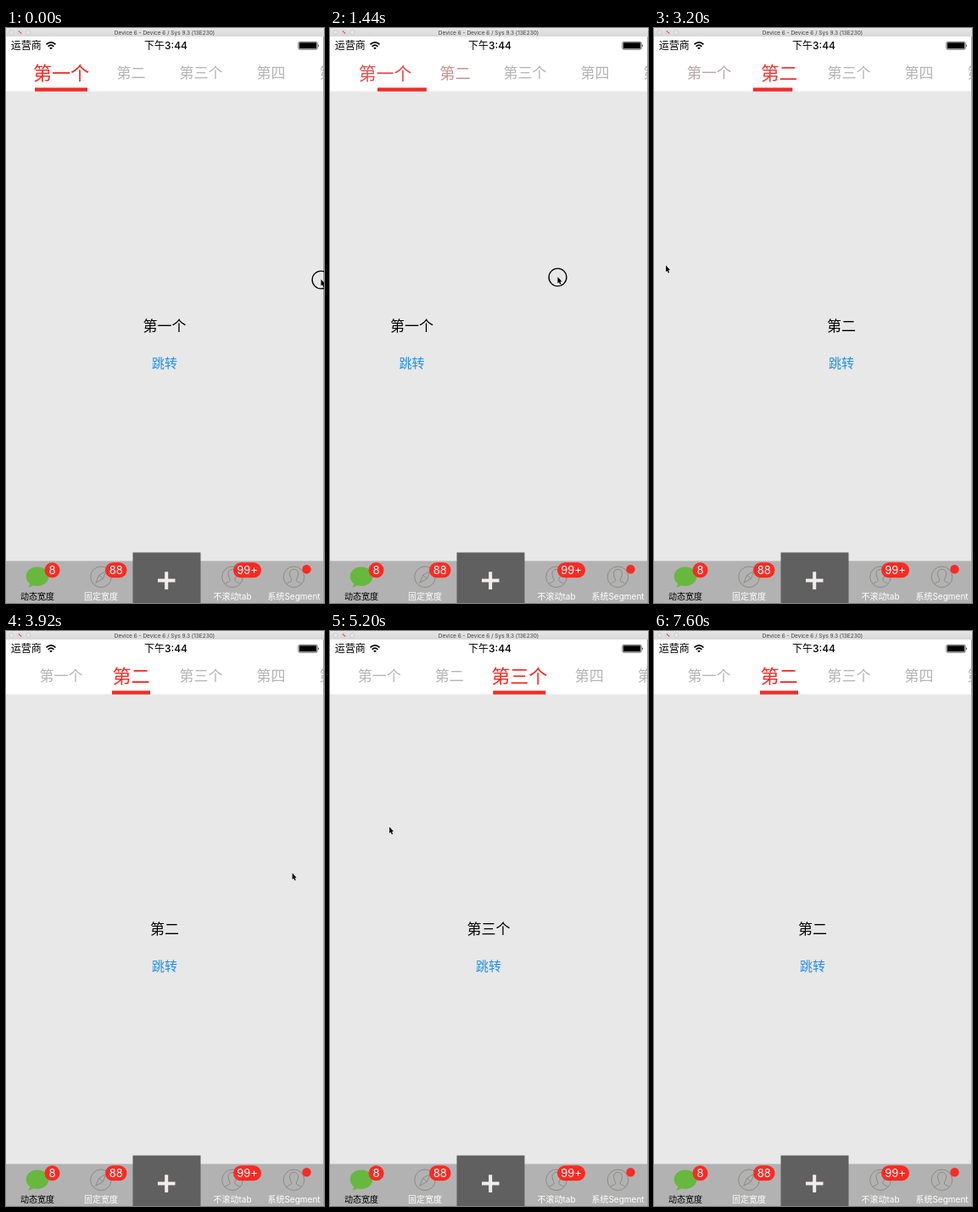
An HTML page that plays this animation: 375 by 677 pixels, repeating every 8160 ms.

```html
<!DOCTYPE html>
<html lang="zh-CN">
<head>
<meta charset="utf-8">
<title>Segmented pages</title>
<style>
  html, body { margin: 0; width: 100%; height: 100%; overflow: hidden; background: #e8e8e8; }
  svg { display: block; width: 375px; height: 677px; }
  text {
    font-family: Inter, "Noto Sans CJK SC", "Noto Sans CJK", "Noto Sans CJK JP", sans-serif;
    text-anchor: middle;
  }
  .tab, .page text { font-size: 17px; font-weight: 300; }
  .page .link { font-size: 15px; fill: #1e8fee; font-weight: 400; }
  .label { font-size: 10px; fill: #fff; }
  .badge { font-size: 13px; fill: #fff; }
  .icon { fill: none; stroke: #8d8a84; stroke-width: 1; }
  .red { fill: #ff2a22; }
</style>
</head>
<body>
<svg viewBox="0 0 375 677">
  <defs>
    <linearGradient id="chrome" x2="0" y2="1">
      <stop stop-color="#e6e6e6"/><stop offset="1" stop-color="#d8d8d8"/>
    </linearGradient>
    <g id="person" class="icon">
      <circle r="12.3"/>
      <path d="M-9 8.3C-7 6-2.8 6.3-2.8 3.8C-2.8 2-5-.2-5-3.6C-5-7-3-9 0-9S5-7 5-3.6C5-.2 2.8 2 2.8 3.8C2.8 6.3 7 6 9 8.3"/>
    </g>
  </defs>

  <rect width="375" height="677" fill="#e8e8e8"/>
  <g id="pages"></g>

  <rect width="375" height="74.5" fill="#fff"/>
  <g id="tabs"><rect id="bar" y="70.3" height="4.4" fill="#f02b27"/></g>

  <rect width="375" height="10" fill="url(#chrome)"/>
  <g fill="#e6e6e6" stroke="#c4c4c4" stroke-width=".7">
    <circle cx="6.5" cy="5" r="2.7"/><circle cx="16.5" cy="5" r="2.7"/><circle cx="26.3" cy="5" r="2.7"/>
  </g>
  <path d="M15 3.6L18 6.4" stroke="#d8443c" stroke-width="1.2"/>
  <text x="187" y="7.6" font-size="6.5" fill="#404040">Device 6 - Device 6 / Sys 9.3 (13E230)</text>

  <text x="23.7" y="25.2" font-size="12">运营商</text>
  <g fill="none" stroke="#000" stroke-width="1.7">
    <path d="M47.5 19.4Q53 14.4 58.5 19.4M49.6 21.8Q53 18.6 56.4 21.8"/>
    <path d="M53 25.3L51.2 23.5Q53 22 54.8 23.5Z" fill="#000" stroke="none"/>
  </g>
  <text x="188.5" y="25" font-size="12" font-weight="500">下午3:44</text>
  <rect x="344.8" y="16.4" width="22.4" height="8.8" rx="1.8" fill="none" stroke="#000" stroke-width=".6"/>
  <rect x="345.8" y="17.3" width="20.4" height="7" rx=".9"/>
  <path d="M368.2 19.2Q369.8 20.8 368.2 22.4Z"/>

  <rect y="627.5" width="375" height="49.5" fill="#b2b2b2"/>
  <path d="M37 634.5C44.5 634.5 50.3 639.3 50.3 645.8S44.5 657 37 657Q34.5 657 32.3 656.3Q29.5 658.6 26.2 658.4Q28.3 656.4 28.2 654.3C25.4 652.3 23.7 649.2 23.7 645.8C23.7 639.3 29.5 634.5 37 634.5Z" fill="#67b83e"/>
  <g class="icon" transform="translate(112 646.3)">
    <circle r="12.3"/><path d="M6.3-7L2.2 2.2L-6.3 7L-2.2-2.2ZM-2.2-2.2L2.2 2.2"/>
  </g>
  <use href="#person" x="267" y="646.3"/>
  <use href="#person" x="339.5" y="646.3"/>
  <rect x="149.5" y="617.5" width="80" height="59.5" fill="#606060"/>
  <path d="M179 650.5H199.5M189.2 640.3V661" stroke="#f3ecec" stroke-width="4"/>

  <text class="label" x="37" y="672.8" style="fill:#000">动态宽度</text>
  <text class="label" x="112" y="673.3">固定宽度</text>
  <text class="label" x="267" y="673.3">不滚动tab</text>
  <text class="label" x="339.5" y="673.3">系统Segment</text>

  <rect class="red" x="45.5" y="629.3" width="18" height="18" rx="9"/>
  <rect class="red" x="117" y="629.3" width="25.5" height="18" rx="9"/>
  <rect class="red" x="268" y="629.3" width="33" height="18" rx="9"/>
  <circle class="red" cx="354.5" cy="637.3" r="5.2"/>
  <text class="badge" x="54.5" y="642.8">8</text>
  <text class="badge" x="129.7" y="642.8">88</text>
  <text class="badge" x="284.5" y="642.8">99+</text>

  <path d="M374.5 10V677" stroke="#a8a09c"/>

  <g id="cursor">
    <circle id="press" r="10.4" fill="none" stroke="#000" stroke-width="1.35"/>
    <path d="M0-.4V7L1.6 5.7L2.8 8.4L4 7.9L2.9 5.2L4.9 5Z"/>
  </g>
</svg>
<script>
const LOOP = 8160, STEP = 80, PAGE = 375, GAP = 82.5;
const names = ['第一个', '第二', '第三个', '第四', '第五个'];
const GRAY = [180, 180, 180], RED = [244, 42, 37];

const $ = id => document.getElementById(id);
const lerp = (a, b, k) => a + (b - a) * k;
const linear = k => k;
const easeOut = k => 1 - (1 - k) ** 2;
const easeInOut = k => k * k * (3 - 2 * k);
const jump = () => 0;

// Each key is [time, value, easing towards the next key].
function track(keys, t) {
  const next = keys.findIndex(key => key[0] > t);
  if (next < 0) return keys[keys.length - 1][1];
  if (next === 0) return keys[0][1];
  const [t0, v0, ease = linear] = keys[next - 1], [t1, v1] = keys[next];
  return lerp(v0, v1, ease((t - t0) / (t1 - t0)));
}

const pageOffset = [
  [520, 0], [680, 7], [1440, 90.5], [2400, 219], [3200, 341, easeOut], [3520, 375],
  [4120, 375], [4240, 394], [4640, 576.5, easeOut], [5120, 750, jump], [6000, 375]
];
const tabScroll = [[5120, 0, easeInOut], [5440, 43], [6080, 43, easeInOut], [6400, 0]];
const cursorX = [
  [500, 371.5], [1440, 268.5], [2400, 128], [3140, 14], [3240, 14, easeInOut], [4000, 348],
  [4080, 348], [4560, 76], [4640, 61], [4960, 66, easeInOut], [5920, 92],
  [6560, 92], [6880, 81], [7120, 81], [7200, 105]
];
const cursorY = [
  [500, 296.5], [1440, 293.5], [2400, 281.5], [3200, 280], [4000, 286], [4640, 277],
  [4960, 264, easeInOut], [5920, 53], [6560, 53], [6880, 46], [7120, 46], [7200, 3]
];
const pressed = [[0, 3160], [4000, 4600], [5920, 6000]];

function add(parent, tag, attrs, text = '') {
  const node = document.createElementNS('http://www.w3.org/2000/svg', tag);
  for (const key in attrs) node.setAttribute(key, attrs[key]);
  node.textContent = text;
  return parent.appendChild(node);
}

const tabs = names.map(name => add($('tabs'), 'text', { class: 'tab', y: 6.1 }, name));
names.slice(0, 3).forEach((name, i) => {
  const page = add($('pages'), 'g', { class: 'page', transform: `translate(${187 + i * PAGE})` });
  add(page, 'text', { y: 357.2 }, name);
  add(page, 'text', { y: 399.9, class: 'link' }, '跳转');
});

const barWidth = i => names[i].length === 3 ? 62 : 45;

function render(t) {
  const offset = track(pageOffset, t), position = offset / PAGE;
  $('pages').setAttribute('transform', `translate(${-offset})`);
  $('tabs').setAttribute('transform', `translate(${-track(tabScroll, t)})`);

  tabs.forEach((tab, i) => {
    const active = Math.max(0, 1 - Math.abs(position - i));
    const color = GRAY.map((c, n) => Math.round(lerp(c, RED[n], active)));
    tab.setAttribute('transform', `translate(${65 + i * GAP} 53) scale(${1 + 0.3 * active})`);
    tab.setAttribute('fill', `rgb(${color})`);
  });

  const from = Math.floor(position);
  const width = lerp(barWidth(from), barWidth(from + 1), position - from);
  $('bar').setAttribute('width', width);
  $('bar').setAttribute('x', 65 + position * GAP - width / 2);

  $('cursor').setAttribute('transform', `translate(${track(cursorX, t)} ${track(cursorY, t)})`);
  $('cursor').style.display = t < 7280 ? '' : 'none';
  $('press').style.display = pressed.some(([a, b]) => t >= a && t < b) ? '' : 'none';
}

const start = performance.now();
function tick() {
  const t = (performance.now() - start) % LOOP;
  render(Math.floor(t / STEP) * STEP);
  requestAnimationFrame(tick);
}
tick();
</script>
</body>
</html>
```
